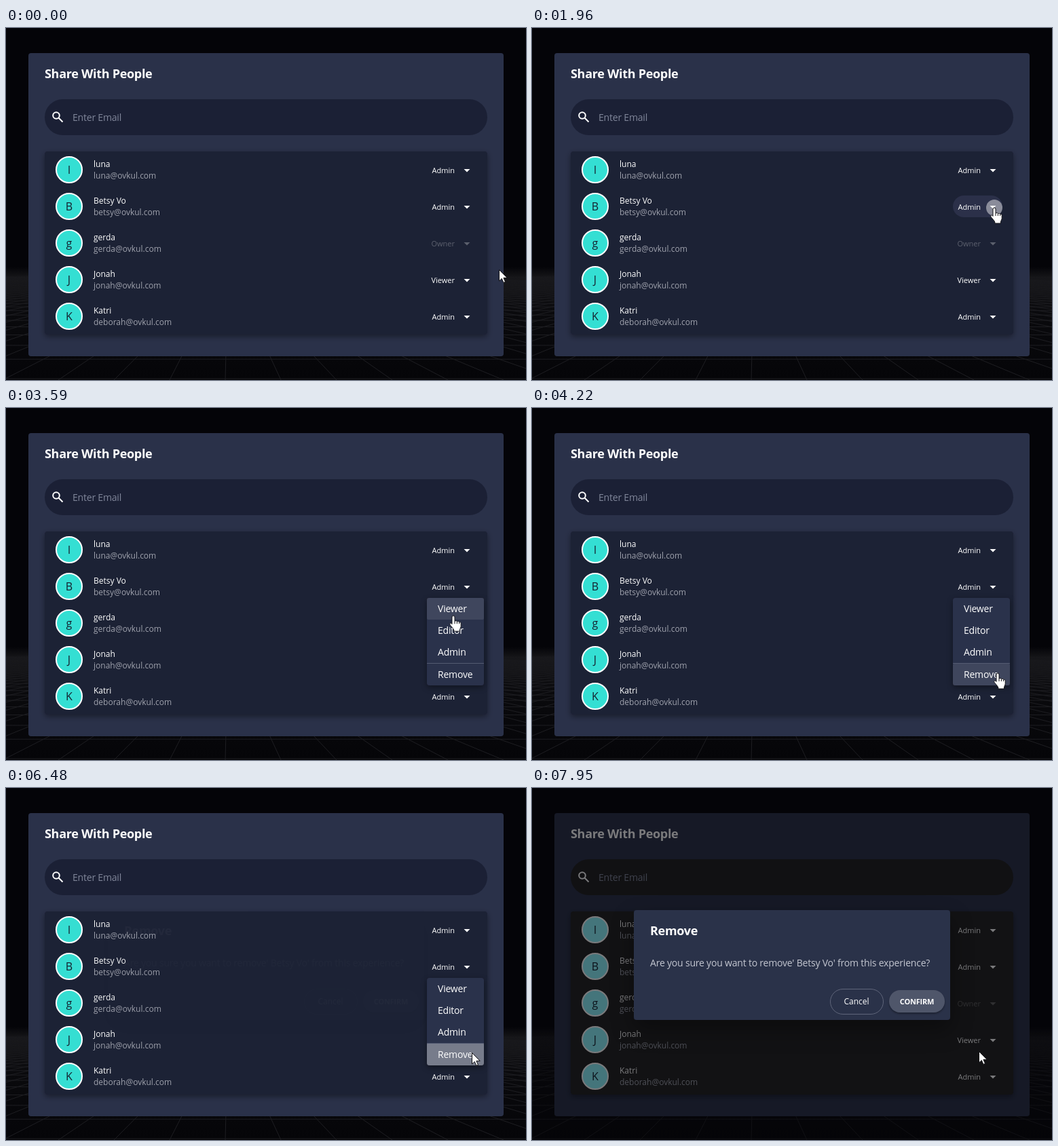
Animation, 766 px wide and 519 px high, one loop 8 s. Source, as an HTML page:

```html
<!DOCTYPE html>
<html lang="en">
<head>
<meta charset="utf-8">
<title>Share With People</title>
<style>
html, body { margin: 0; width: 100%; height: 100%; overflow: hidden; background: #040408; }
svg { display: block; width: 766px; height: 519px; }
text { font: 500 14px "Open Sans", "Noto Sans", sans-serif; fill: #fff; }
.title { font-size: 18px; font-weight: 700; letter-spacing: -.3px; }
.body, .menu text { letter-spacing: -.2px; }
.name, .mail, .cancel { font-size: 12px; }
.mail { fill: #a0a3ae; }
.role { font-size: 11px; text-anchor: end; }
.letter { font-size: 16px; font-weight: 400; fill: #15202e; text-anchor: middle; }
.off { opacity: .28; }
.hint { fill: #80869a; }
.ask { fill: #c4c7d1; }
.cancel, .confirm { text-anchor: middle; }
.confirm { font-size: 11px; font-weight: 700; letter-spacing: -.2px; }

.avatar { fill: #34dfd3; stroke: #fff; stroke-width: 2; }
.avatar, .panel, .chip, .click, .menu, .hover, .ripple, .dim, .dialog, .cursor, .hand, .arrow {
  animation: 8s linear infinite;
}
.chip, .click, .hover, .hand, .arrow { animation-timing-function: step-end; }

.avatar { animation-name: avatar; }
@keyframes avatar { 0%, 81% { fill: #34dfd3; } 81.875% { fill: #69bcc3; } 83.875%, 100% { fill: #8cf5fd; } }

.panel { animation-name: panel; }
@keyframes panel { 0%, 81% { fill: #1b2035; } 81.875%, 100% { fill: #202021; } }

.chip { animation-name: chip; }
@keyframes chip { 0% { opacity: 0; } 13.2% { opacity: 1; } 27.375% { opacity: 0; } }

.click { animation-name: click; }
@keyframes click {
  0% { opacity: 0; transform: translate(681px, 265px); }
  24.5% { opacity: .45; transform: translate(681px, 265px); }
  26.375% { opacity: 0; transform: translate(686px, 391px); }
  64.375% { opacity: .45; transform: translate(686px, 391px); }
  66.375%, 100% { opacity: 0; transform: translate(686px, 391px); }
}

.menu { animation-name: menu; transform-origin: 620px 280px; }
@keyframes menu {
  0%, 26.2% { opacity: 0; transform: scale(.8); }
  27.4% { opacity: .75; transform: scale(.95); }
  29.375% { opacity: .95; transform: none; }
  32.2%, 81.05% { opacity: 1; transform: none; }
  81.875% { opacity: .4; transform: scale(.985); }
  82.875%, 100% { opacity: 0; transform: scale(.985); }
}

.hover { animation-name: hover; }
@keyframes hover {
  0% { opacity: 0; transform: none; }
  43.25% { opacity: .1; transform: none; }
  45.25% { opacity: .1; transform: translateY(32px); }
  47.1% { opacity: .1; transform: translateY(64px); }
  49.1%, 100% { opacity: .1; transform: translateY(97px); }
}

.ripple { animation-name: ripple; transform-origin: 686px 391px; }
@keyframes ripple {
  0%, 66.3% { opacity: 0; transform: scale(.1); }
  66.4% { opacity: .12; transform: scale(.2); }
  70.375%, 81% { opacity: .3; transform: none; }
  81.875%, 100% { opacity: .1; transform: none; }
}

.dim { animation-name: dim; }
@keyframes dim { 0%, 81% { opacity: 0; } 81.875% { opacity: .37; } 83.875%, 100% { opacity: .53; } }

.dialog { animation-name: dialog; }
@keyframes dialog {
  0%, 80.9% { opacity: 0; }
  81% { opacity: .02; }
  81.875% { opacity: .8; }
  83.875%, 100% { opacity: 1; }
}

.cursor { animation-name: cursor; }
@keyframes cursor {
  0%, 6.75% { transform: translate(726px, 357px); animation-timing-function: ease-in-out; }
  13.75%, 40.5% { transform: translate(681px, 265px); }
  43.5% { transform: translate(668px, 284px); }
  45.5% { transform: translate(655px, 316px); }
  47.25% { transform: translate(660px, 346px); }
  49.1% { transform: translate(675px, 376px); }
  50.75%, 51.7% { transform: translate(684px, 388px); }
  52.75%, 99.37% { transform: translate(686px, 391px); }
  99.375%, 100% { transform: translate(658px, 389px); }
}

.hand { animation-name: hand; }
.arrow { animation-name: arrow; }
@keyframes hand { 0% { opacity: 0; } 13.2% { opacity: 1; } 27.375% { opacity: 0; } 43.25% { opacity: 1; } 80%, 100% { opacity: 0; } }
@keyframes arrow { 0% { opacity: 1; } 13.2% { opacity: 0; } 27.375% { opacity: 1; } 43.25% { opacity: 0; } 80%, 100% { opacity: 1; } }
</style>
</head>
<body>
<svg viewBox="0 0 766 519">
  <defs>
    <linearGradient id="haze" x1="0" y1="0" x2="0" y2="1">
      <stop offset="0" stop-color="#151518" stop-opacity="0"/>
      <stop offset=".09" stop-color="#151518"/>
      <stop offset=".4" stop-color="#0a0a0d"/>
      <stop offset="1" stop-color="#050508"/>
    </linearGradient>
    <linearGradient id="far" gradientUnits="userSpaceOnUse" x1="0" y1="360" x2="0" y2="420">
      <stop offset="0" stop-color="#1d1d21" stop-opacity="0"/>
      <stop offset="1" stop-color="#1d1d21"/>
    </linearGradient>
    <filter id="shadow" x="-20%" y="-20%" width="140%" height="150%">
      <feDropShadow dx="0" dy="3" stdDeviation="4" flood-color="#000" flood-opacity=".4"/>
    </filter>
    <filter id="deep" x="-20%" y="-30%" width="140%" height="180%">
      <feDropShadow dx="0" dy="14" stdDeviation="16" flood-color="#000" flood-opacity=".35"/>
    </filter>
    <filter id="low" x="-10%" y="-20%" width="120%" height="150%">
      <feDropShadow dx="0" dy="2" stdDeviation="1.5" flood-color="#000" flood-opacity=".35"/>
    </filter>
    <clipPath id="item"><path d="M620 377h84v28a4 4 0 01-4 4h-76a4 4 0 01-4-4z"/></clipPath>
  </defs>

  <rect width="766" height="519" fill="#040408"/>
  <rect y="352" width="766" height="167" fill="url(#haze)"/>
  <path id="floor" fill="none" stroke="url(#far)"/>

  <rect x="33" y="37" width="700" height="447" rx="4" fill="#2a3149"/>
  <text class="title" x="57" y="74">Share With People</text>
  <rect class="panel" x="57" y="105" width="652" height="53" rx="26.5"/>
  <g fill="none" stroke="#fff" stroke-width="2">
    <circle cx="74" cy="129" r="4.8"/>
    <path d="M77.5 132.5l6 6"/>
  </g>
  <text class="body hint" x="98" y="137">Enter Email</text>

  <rect class="panel" x="57" y="182" width="652" height="270" rx="4" filter="url(#shadow)"/>
  <rect class="chip" x="620" y="247" width="73" height="32" rx="16" fill="#2b3049"/>
  <g id="rows"></g>

  <g class="menu">
    <rect x="620" y="280" width="84" height="129" rx="4" fill="#2b324b" filter="url(#shadow)"/>
    <rect class="hover" x="620" y="280" width="84" height="32" rx="2" fill="#fff"/>
    <g clip-path="url(#item)"><circle class="ripple" cx="686" cy="391" r="76" fill="#fff"/></g>
    <path d="M620 376.5h84" stroke="#545b72"/>
    <text x="636" y="301">Viewer</text>
    <text x="636" y="333">Editor</text>
    <text x="636" y="365">Admin</text>
    <text x="636" y="398">Remove</text>
  </g>

  <rect class="dim" width="766" height="519" fill="#040409"/>

  <g class="dialog">
    <rect x="150" y="180" width="466" height="162" rx="4" fill="#2a314a" filter="url(#deep)"/>
    <text class="title" x="174" y="217">Remove</text>
    <text class="body ask" x="174" y="263">Are you sure you want to remove' Betsy Vo' from this experience?</text>
    <rect x="439.5" y="296.5" width="78" height="37" rx="18.5" fill="none" stroke="#5f657a"/>
    <text class="cancel" x="478" y="319">Cancel</text>
    <rect x="526" y="298" width="82" height="33" rx="16.5" fill="#50566a" filter="url(#low)"/>
    <text class="confirm" x="567" y="319">CONFIRM</text>
  </g>

  <circle class="click" r="12" fill="#fff"/>
  <g class="cursor" fill="#fff" stroke="#101014" stroke-linejoin="round">
    <path class="arrow" d="M.5-.5v16.5l3.8-3.6 2.6 6 2.6-1.1-2.6-5.9h5.3z"/>
    <g class="hand">
      <path d="M-2 2a2 2 0 014 0v6c1-.8 3-.6 3.4.6 1-.6 2.8-.2 3.2 1 1-.4 2.6 0 2.6 1.8v4c0 2-1.4 3.4-1.8 5.4v2.2h-8.6v-2c-1-2-3-4.4-5-6.6-1-1.4-1.6-2.6-.4-3.2 1-.6 2.2.4 2.6 1.2z"/>
      <path d="M2 8v4M5.4 9v3M8.6 10v2" fill="none"/>
    </g>
  </g>
</svg>
<script>
const people = [
  ["luna", "luna", "Admin"],
  ["Betsy Vo", "betsy", "Admin"],
  ["gerda", "gerda", "Owner"],
  ["Jonah", "jonah", "Viewer"],
  ["Katri", "deborah", "Admin"]
];

const row = ([name, user, role], i) => `
  <g transform="translate(0 ${209 + 54 * i})">
    <circle class="avatar" cx="93" r="19"/>
    <text class="letter" x="93" y="6">${name[0]}</text>
    <text class="name" x="129" y="-4">${name}</text>
    <text class="mail" x="129" y="13">${user}@ovkul.com</text>
    <g class="${role === "Owner" ? "off" : ""}">
      <text class="role" x="661" y="5">${role}</text>
      <path d="M674.5-1h9l-4.5 4.5z" fill="#fff"/>
    </g>
  </g>`;
document.getElementById("rows").innerHTML = people.map(row).join("");

// Perspective floor: lines across, then lines fanning out from the vanishing point
let floor = "";
for (let n = 5; n < 40; n++) floor += `M0 ${(345 + 860 / n).toFixed(1)}h766`;
for (let k = -40; k <= 40; k++) floor += `M327 350L${323 + 82 * k} 519`;
document.getElementById("floor").setAttribute("d", floor);
</script>
</body>
</html>
```
